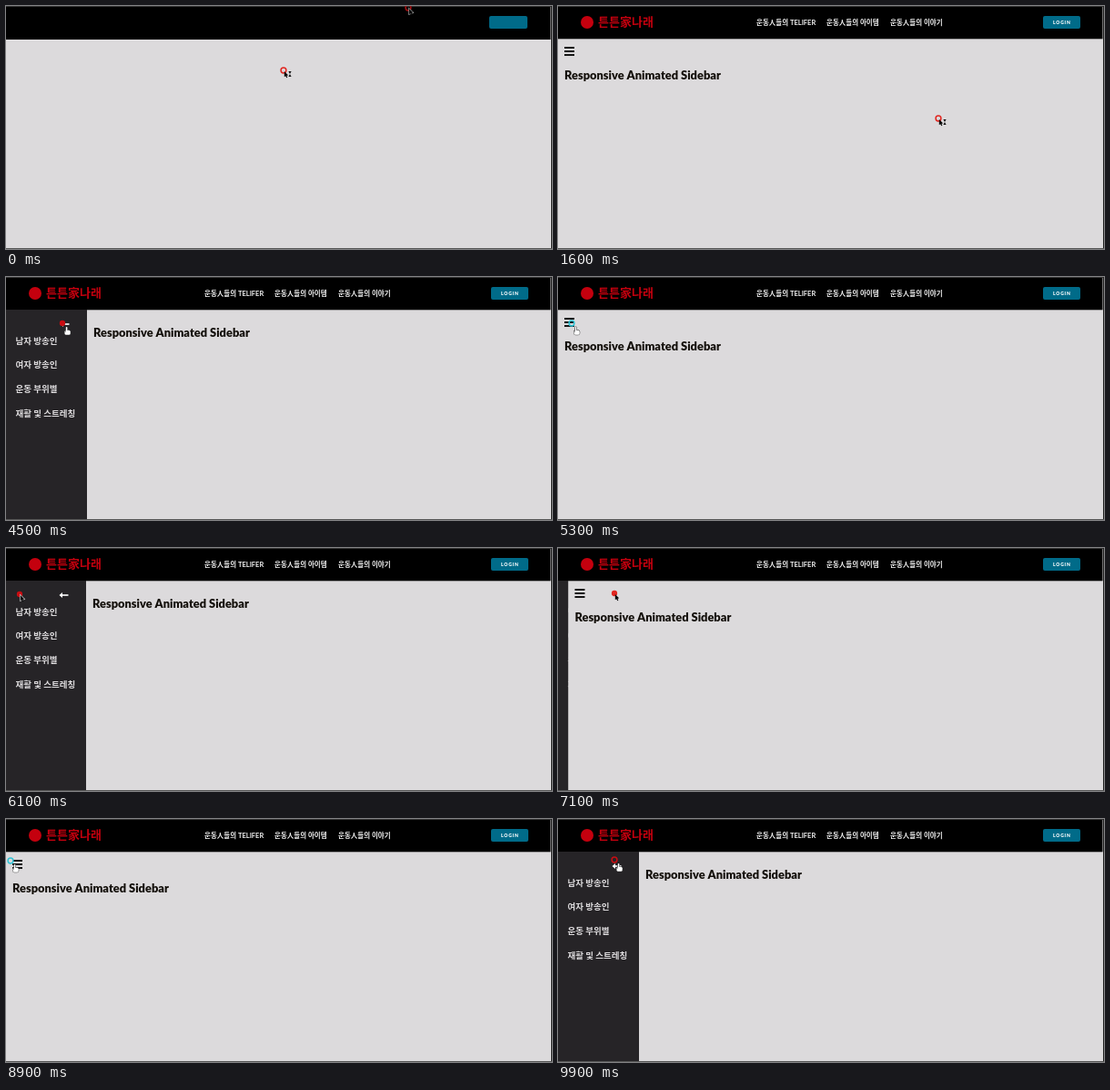
An HTML page with a canvas that plays this animation: 600x268 px, repeating every 10000 ms.

```html
<!DOCTYPE html>
<html lang="ko">
<head>
<meta charset="utf-8">
<title>Responsive Animated Sidebar</title>
<style>
html, body { margin: 0; width: 100%; height: 100%; overflow: hidden; background: #dcdadc; }
canvas { display: block; width: 600px; height: 268px; }
</style>
</head>
<body>
<canvas id="stage" width="600" height="268"></canvas>
<script>
const ctx = document.getElementById('stage').getContext('2d');
const LOOP = 10000, STEP = 100;
const LOADED = 1400, LEAVE = 2000;
const SLIDE = 500, SIDEBAR = 89;
const FONT = 'Lato, "Noto Sans CJK KR", "Noto Sans CJK", sans-serif';
const PAGE = '#dcdadc', TEAL = '#006b89', LOGO = '#c4000e';
const RED = '#e12620', DEEP_RED = '#c90d12', CYAN = '#2fc4d6';

// The pointer visits one spot per beat and clicks on every beat but the scrolling one.
const FIRST_BEAT = 3390, BEAT = 1140, DWELL = 430, TRAVEL = 250, SCROLL_BEAT = 4;
const WAIT_SPOT = [418, 124];
const spots = [[11, 46], [62, 51], [15, 51], [62, 50], [115, 64], [5, 46], [62, 45]];
const beatTime = i => FIRST_BEAT + BEAT * i;
const clicks = spots.map((_, i) => beatTime(i)).filter((_, i) => i !== SCROLL_BEAT);

const clamp = x => Math.min(1, Math.max(0, x));
const smooth = x => clamp(x) ** 2 * (3 - 2 * clamp(x));
const mix = (a, b, k) => a.map((v, i) => v + (b[i] - v) * k);

// CSS "ease": cubic-bezier(.25, .1, .25, 1)
function ease(x) {
  const bezier = (u, p, q) => 3 * u * (1 - u) ** 2 * p + 3 * u * u * (1 - u) * q + u ** 3;
  let lo = 0, hi = 1;
  for (let i = 0; i < 20; i++) {
    const mid = (lo + hi) / 2;
    if (bezier(mid, .25, .25) < clamp(x)) lo = mid; else hi = mid;
  }
  return bezier(hi, .1, 1);
}

function pointerAt(t) {
  if (t < LEAVE) {
    const k = smooth(t / 1100);
    const [x, y] = mix([305, 71], WAIT_SPOT, k);
    return [x - 120 * Math.sin(Math.PI * k) * (1 - k), y];
  }
  const i = Math.floor((t - FIRST_BEAT - DWELL) / BEAT);
  if (i < 0) return mix(WAIT_SPOT, spots[0], smooth((t - LEAVE) / 1000));
  return mix(spots[i], spots[i + 1], smooth((t - beatTime(i) - DWELL) / TRAVEL));
}

function sidebarAt(t) {
  const past = clicks.filter(click => click <= t);
  if (!past.length) return { open: false, width: 0 };
  const open = past.length % 2 === 1;
  const k = ease((t - past[past.length - 1]) / SLIDE);
  return { open, width: SIDEBAR * (open ? k : 1 - k) };
}

const scrollAt = t => 36 * (smooth((t - 7490) / 220) - smooth((t - 8100) / 300));

function rect(x, y, w, h, color) {
  ctx.fillStyle = color;
  ctx.fillRect(x, y, w, h);
}

function rounded(x, y, w, h, r, color, outline) {
  ctx.beginPath();
  ctx.roundRect(x, y, w, h, r);
  if (outline) {
    ctx.strokeStyle = outline;
    ctx.lineWidth = 1;
    ctx.stroke();
  }
  ctx.fillStyle = color;
  ctx.fill();
}

function triangle(a, b, c, color, outline) {
  ctx.beginPath();
  [a, b, c].forEach(([x, y]) => ctx.lineTo(x, y));
  ctx.closePath();
  if (outline) {
    ctx.strokeStyle = outline;
    ctx.lineWidth = 1.3;
    ctx.stroke();
  }
  ctx.fillStyle = color;
  ctx.fill();
}

function text(str, x, y, size, weight, color, spacing = 0) {
  ctx.font = `${weight} ${size}px ${FONT}`;
  ctx.letterSpacing = spacing + 'px';
  ctx.fillStyle = color;
  ctx.fillText(str, x, y);
}

function ring(x, y, color, pressed) {
  ctx.beginPath();
  ctx.arc(x, y, pressed ? 2.4 : 2.9, 0, 2 * Math.PI);
  ctx.strokeStyle = color;
  ctx.lineWidth = 1.5;
  ctx.stroke();
  if (pressed) {
    ctx.fillStyle = color;
    ctx.fill();
  }
}

function arrow(x, y, outline) {
  triangle([x, y], [x, y + 6], [x + 4.3, y + 4.3], '#0a0a0a', outline);
  ctx.beginPath();
  ctx.moveTo(x + 1.6, y + 4);
  ctx.lineTo(x + 3, y + 7);
  ctx.strokeStyle = '#0a0a0a';
  ctx.lineWidth = 1.2;
  ctx.stroke();
}

function hand(x, y) {
  rounded(x - 3, y - .8, 6.2, 5, 1.5, '#fff', '#222');
  rounded(x - 1.7, y - 4.5, 1.6, 6, .8, '#fff', '#222');
  rect(x - 1.7, y - .6, 4, 3, '#fff');
}

function busyPointer(x, y) {
  ring(x, y, RED);
  arrow(x + .8, y + 1);
  const glass = [x + 7, y + 4];
  for (const side of [-3, 3]) {
    const base = glass[1] + side;
    triangle(glass, [glass[0] - 1.6, base], [glass[0] + 1.6, base], '#111');
  }
}

function drawHeader() {
  rect(0, 0, 598.5, 36.3, '#000');
  ctx.beginPath();
  ctx.arc(32, 18, 7, 0, 2 * Math.PI);
  ctx.fillStyle = LOGO;
  ctx.fill();
  text('튼튼家나래', 44, 18.5, 13, 700, LOGO);
  text('운동人들의 TELIFER', 218, 18.8, 7.5, 700, '#f2f2f2');
  text('운동人들의 아이템', 295, 18.8, 7.5, 700, '#f2f2f2');
  text('운동人들의 이야기', 365, 18.8, 7.5, 700, '#f2f2f2');
  rounded(533, 11, 41, 14, 2, TEAL);
  text('LOGIN', 544, 18.3, 5, 900, '#fff', .8);
}

function drawSidebar(width) {
  ctx.save();
  ctx.beginPath();
  ctx.rect(0, 36, width, 232);
  ctx.clip();
  rect(0, 36, width, 232, '#262427');
  ['남자 방송인', '여자 방송인', '운동 부위별', '재활 및 스트레칭'].forEach((label, i) =>
    text(label, 10.5, 70.7 + i * 26.7, 9.5, 700, '#dedcde'));
  const x = width - 29.5;
  rect(x + 2, 51.2, 8, 1.6, '#fff');
  triangle([x, 52], [x + 3.5, 49], [x + 3.5, 55], '#fff');
  ctx.restore();
}

function drawPage(t, side) {
  if (t < LOADED) {
    rect(0, 0, 598.5, 37, '#000');
    rounded(531, 11, 42, 14, 2, TEAL);
    return;
  }
  ctx.save();
  ctx.translate(0, -scrollAt(t));
  drawHeader();
  const left = 7 + side.width;
  if (!side.open) {
    for (let i = 0; i < 3; i++) rect(left, 45 + i * 4, 11, 2, '#151515');
  }
  text('Responsive Animated Sidebar', left, side.open ? 61.7 : 77.2, 12.85, 900, '#130f0a');
  if (side.width > 0) drawSidebar(side.width);
  ctx.restore();
}

function drawPointer(t, side) {
  const [x, y] = pointerAt(t);
  if (t < STEP) {
    ring(442, 2, '#a30f12');
    arrow(443, 3, '#aaa');
  }
  if (t < LEAVE) return busyPointer(x, y);
  if (t < 4300) busyPointer(...WAIT_SPOT);

  const pressed = clicks.some(click => t >= click - 100 && t < click + DWELL + 50);
  const onBurger = !side.open && x < 20 && y < 58;
  const onClose = side.open && Math.hypot(x - 62, y - 50) < 8;
  ring(x, y, onBurger && !pressed ? CYAN : side.open ? DEEP_RED : RED, pressed);
  if (onBurger || onClose) hand(x + 5.5, y + 8.5);
  else arrow(x + .8, y + 1, x < side.width ? '#ccc' : null);
}

function draw(t) {
  const side = sidebarAt(t);
  ctx.textBaseline = 'middle';
  rect(0, 0, 600, 268, PAGE);
  drawPage(t, side);
  rect(0, 0, 600, 1, '#333');
  rect(599, 0, 1, 268, '#222');
  rect(0, 267, 600, 1, '#555');
  drawPointer(t, side);
}

const begin = performance.now();
function tick() {
  const t = (performance.now() - begin) % LOOP;
  draw(Math.floor(t / STEP) * STEP);
  requestAnimationFrame(tick);
}
tick();
</script>
</body>
</html>
```
